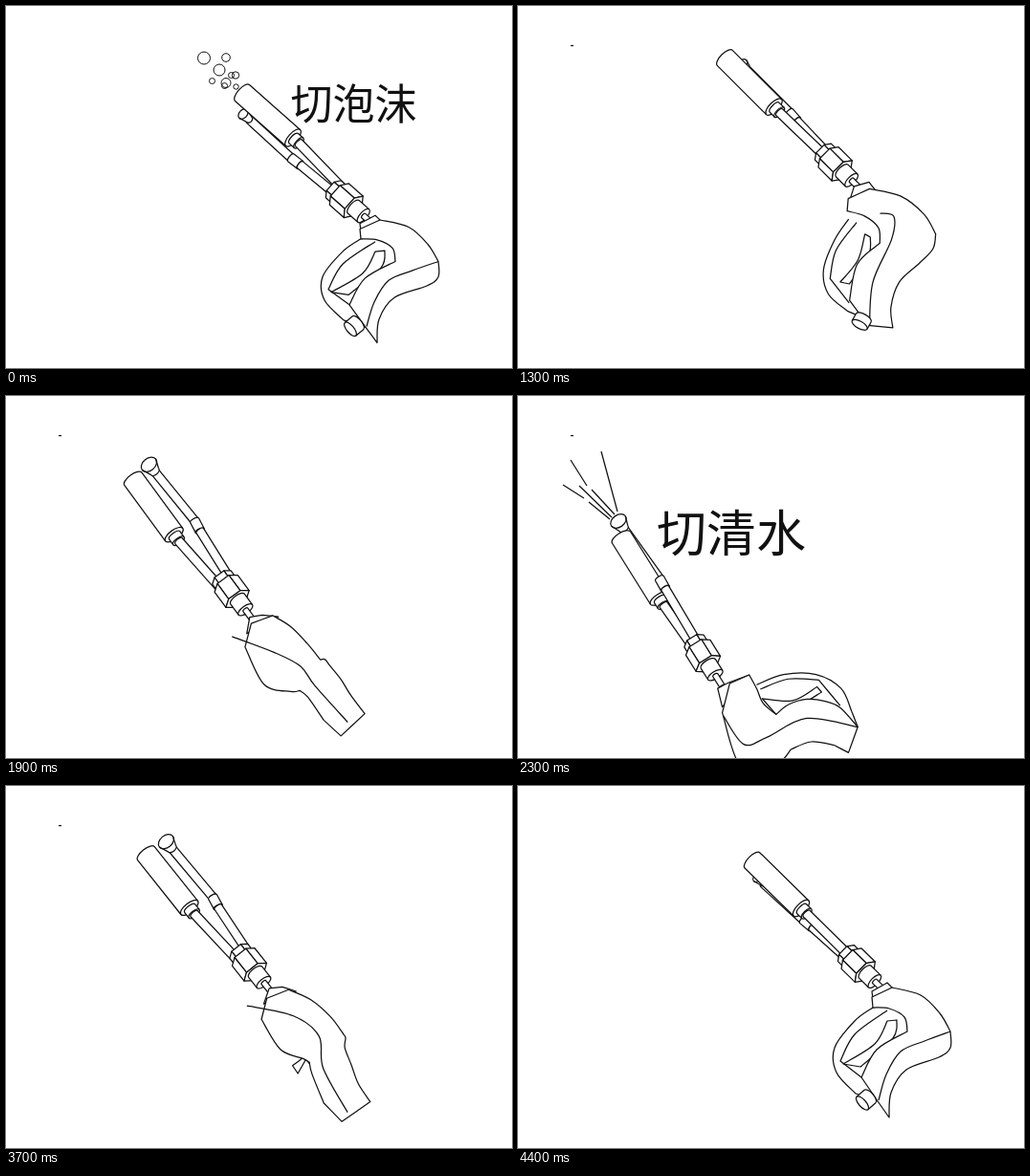
Write an HTML page that moves like this. It is 529 px wide and 379 px high and loops after 4600 ms.

```html
<!DOCTYPE html>
<html lang="zh">
<head>
<meta charset="utf-8">
<style>
html, body { margin: 0; width: 100%; height: 100%; overflow: hidden; background: #fff; }
svg { display: block; width: 529px; height: 379px; }
path, circle { fill: #fff; stroke: #111; stroke-width: 1.25; stroke-linejoin: round; }
.line { fill: none; }
circle { fill: none; stroke-width: 1; }
text { font-family: "Noto Sans CJK SC", "Noto Sans CJK", sans-serif; fill: #111; }
</style>
</head>
<body>
<svg id="stage" viewBox="0 0 529 379"></svg>
<script>
// Barrel: start and end of the wide tube, nozzle, pipe joint, nut, nozzle radius.
// Handle: key points of smooth curves; a slash marks a corner.
const right = {
  barrel: '245 78 296 128 250 96 298 140 355 187 5',
  box: '372 232/370 215/386 206/391 211',
  loop: '371 232 352 246 331 274 333 300 353 322/376 330',
  window: '386 235 352 260 337 288/359 305',
  trigger: '340 291/373 270 386 246/396 245/392 264 358 294',
  body: '370 221/391 211/421 219 441 238 452 257/452 274 440 284 406 297 390 321 388 347/376 330/359 305/375 276 407 257/404 242 388 233 371 232',
  edge: '452 257 425 267 400 278 385 302 377 329',
  knob: '368 325 360 332'
};
const middle = {
  barrel: '188 48 238 101 212 46 262 100 303 160 8',
  box: '318 198/326 183/341 181/350 190',
  loop: '321 224 313 248 312 278 321 302 340 318/350 325',
  window: '325 228 316 256 319 284/338 315',
  trigger: '327 289/338 268 344 240/347 246/344 265 332 292',
  body: '318 198/341 188/372 196 398 215 411 236/408 248 396 264 387 286 385 312 391 331/358 340/338 315/338 275 352 254/350 240 334 227 315 214',
  edge: '318 203 358 205 372 234 356 285 361 339',
  knob: '356 328 355 335'
};
const left = {
  barrel: '106 132 143 194 109 113 154 172 196 252 9',
  box: '214 306/209 286/221 281/243 275',
  loop: '251 286 280 278 315 281 342 298 353 322/360 340',
  window: '255 291 285 283 318 287/341 316',
  trigger: '257 301/290 306 316 294/321 300/295 313 272 319',
  body: '222 282/243 275/251 290 258 306 272 319/285 310 305 306 325 310 341 318 360 340/350 366/335 357/310 351 288 357/272 371 234 370 214 312',
  edge: '215 315 237 347 262 342 305 326 360 340',
  knob: '348 334 352 335'
};

const numbers = s => s.split(/[ /]/).map(Number);
const mapParts = (pose, f) => Object.fromEntries(Object.keys(pose).map(name => [name, f(name)]));

// A held pose: its own barrel, with the handle slightly tilted
const tilt = (pose, barrel, f) => ({
  ...mapParts(pose, name => pose[name].replace(/(\d+) (\d+)/g, (_, x, y) => f(+x, +y).join(' '))),
  barrel
});
const foam = tilt(right, '247 91 300 138 248 113 298 159 355 203 6', (x, y) => [x, y * 0.945 + 24.6]);
const water = tilt(left, '108 148 148 212 105 131 148 191 193 271 9', (x, y) => [x * 0.97 + 6, y - x * 0.09 + 38.9]);

// Swing: a quadratic through right (0), middle (4) and left (10)
function swing(i) {
  const w = [(i - 4) * (i - 10) / 40, i * (i - 10) / -24, i * (i - 4) / 60];
  return mapParts(right, name => {
    const b = numbers(middle[name]), c = numbers(left[name]);
    let n = 0;
    return right[name].replace(/\d+/g, a => (a * w[0] + b[n] * w[1] + c[n++] * w[2]).toFixed(2));
  });
}

const path = (d, cls = '') => `<path class="${cls}" d="${d}"/>`;
const pairs = a => Array.from({ length: a.length / 2 }, (_, i) => [a[2 * i], a[2 * i + 1]]);
const angle = (p, q) => Math.atan2(q[1] - p[1], q[0] - p[0]);
const move = (p, a, d) => [p[0] + Math.cos(a) * d, p[1] + Math.sin(a) * d];
const toward = (p, q, d) => move(p, angle(p, q), d);

// Catmull-Rom through each run between corners
function curve(s) {
  let last, d = '';
  for (const run of s.split('/')) {
    const p = pairs(numbers(run));
    if (last) p.unshift(last);
    else d = 'M' + p[0];
    for (let i = 0; i < p.length - 1; i++) {
      const a = p[i - 1] || p[i], b = p[i], c = p[i + 1], e = p[i + 2] || c;
      d += `C${b.map((v, k) => v + (c[k] - a[k]) / 6)} ${c.map((v, k) => v - (e[k] - b[k]) / 6)} ${c}`;
    }
    last = p[p.length - 1];
  }
  return d;
}

// Cylinder from p to q; its end at q is open to view
function tube(p, q, r, end = r, k = 0.42) {
  const a = angle(p, q), side = a + Math.PI / 2;
  const arc = (r, to) => `A${r * k} ${r} ${a * 180 / Math.PI} 0 1 ${to}`;
  const p1 = move(p, side, r), p2 = move(p, side, -r), q1 = move(q, side, end), q2 = move(q, side, -end);
  return path(`M${p1}${arc(r, p2)}L${q2}${arc(end, q1)}Z`) + path(`M${q1}${arc(end, q2)}`, 'line');
}

// Hexagonal drum around the same kind of axis
function drum(p, q, r) {
  const a = angle(p, q);
  const corner = (c, j) => move(move(c, a, r * 0.42 * Math.sin(j * Math.PI / 3)), a + Math.PI / 2, r * Math.cos(j * Math.PI / 3));
  const ring = [0, 1, 2, 3, 4, 5];
  const sides = ring.slice(3).map(j => path(`M${corner(p, j)}L${corner(p, j + 1)}L${corner(q, j + 1)}L${corner(q, j)}Z`));
  return sides.join('') + path('M' + ring.map(j => corner(q, j)).join('L') + 'Z');
}

function barrelParts(s) {
  const v = numbers(s), [tip, end, nozzle, joint, nut] = pairs(v.slice(0, 10)), r = v[10];
  const a = angle(tip, end), at = d => move(nut, a, d);
  // where a pipe enters the nut: half its own distance from the axis
  const entry = p => {
    const side = a + Math.PI / 2;
    const off = (p[0] - nut[0]) * Math.cos(side) + (p[1] - nut[1]) * Math.sin(side);
    return move(nut, side, off / 2);
  };
  const collar = move(end, a, 8), bend = toward(joint, nut, 12), neck = toward(nozzle, joint, 9);
  return {
    wide: tube(tip, end, 11.3) + tube(move(end, a, 1), collar, 7) + tube(collar, entry(collar), 4.8),
    upper: tube(neck, joint, 4.5) + tube(neck, nozzle, r * 0.6, r, 0.7),
    lower: tube(joint, bend, 5) + tube(bend, entry(bend), 4.5),
    nut: drum(at(-17), at(-8), 12) + drum(at(-9), at(11), 15) + tube(at(11), at(25), 9) + tube(at(25), at(39), 3)
  };
}

// order: thin pipe 'behind' or 'front' of the wide tube, or 'split' around it
function gun(pose, order, knobFront) {
  const b = barrelParts(pose.barrel);
  const pipes = {
    behind: b.upper + b.lower + b.wide,
    front: b.wide + b.upper + b.lower,
    split: b.upper + b.wide + b.lower
  };
  const knob = tube(...pairs(numbers(pose.knob)), 9);
  const solid = name => path(curve(pose[name]) + 'Z');
  return pipes[order] + b.nut + solid('box') + (knobFront ? '' : knob) +
    path(curve(pose.loop)) + solid('trigger') + path(curve(pose.window), 'line') +
    solid('body') + path(curve(pose.edge), 'line') + (knobFront ? knob : '');
}

const label = (x, y, size, s) => `<text x="${x}" y="${y}" font-size="${size}">${s}</text>`;
const bubbles = [[207, 54.5, 6.5], [230, 54, 4.3], [223, 67, 6], [215.5, 78.5, 3], [235.5, 72.5, 3],
  [240, 72.5, 3.7], [230, 80.5, 5], [228.5, 83.5, 3], [240.5, 84.5, 2.7]]
  .map(([x, y, r]) => `<circle cx="${x}" cy="${y}" r="${r}"/>`).join('');
const spray = path('M87 58L104 121M55 67L72 94M77 98L101 124M47 93L69 107M74 111L96 129M64 94L98 127', 'line');
const speck = path('M55 41.5H58', 'line');

const scenes = Array.from({ length: 11 }, (_, i) =>
  gun(swing(i), i < 6 ? 'behind' : 'front', i < 3) + (i > 1 ? speck : ''));
scenes.push(gun(foam, 'behind', true) + bubbles + label(297.5, 118.5, 44, '切泡沫'));
scenes.push(spray + gun(water, 'split', false) + speck + label(145, 163, 52, '切清水'));

const stage = document.getElementById('stage');
stage.innerHTML = scenes.map(s => `<g visibility="hidden">${s}</g>`).join('');
const groups = [...stage.children];

function sceneAt(t) {
  if (t < 1000) return 11;
  if (t < 1200) return 0;
  if (t < 2300) return Math.min(10, 1 + Math.floor((t - 1200) / 100));
  if (t < 3300) return 12;
  if (t < 3500) return 10;
  return Math.max(0, 9 - Math.floor((t - 3500) / 100));
}

let shown = -1;
const start = performance.now();
function draw() {
  const next = sceneAt((performance.now() - start) % 4600);
  if (next !== shown) {
    groups.forEach((g, i) => g.setAttribute('visibility', i === next ? 'visible' : 'hidden'));
    shown = next;
  }
  requestAnimationFrame(draw);
}
draw();
</script>
</body>
</html>
```
